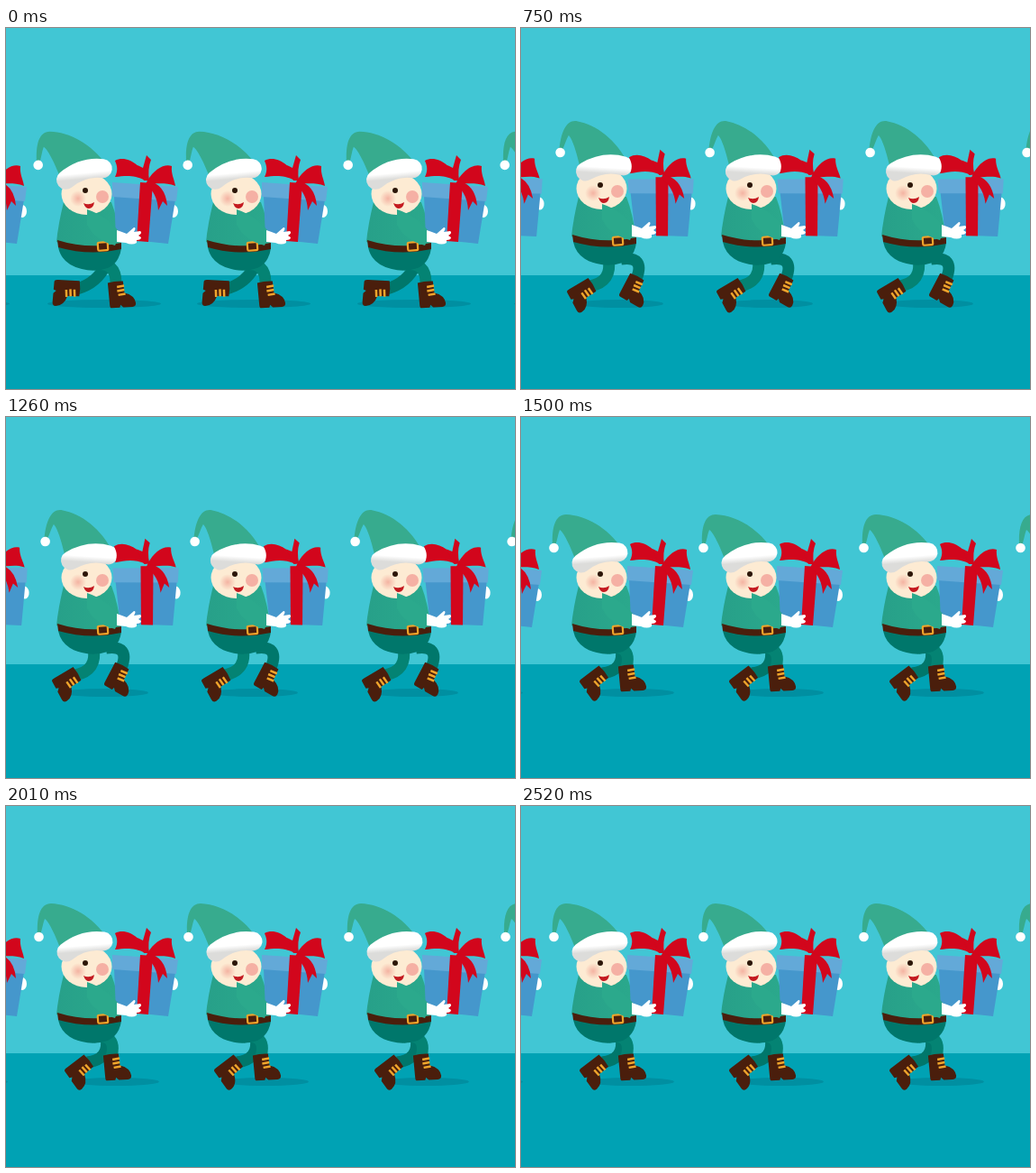
Animation, 565 px wide and 400 px high, one loop 2.55 s. Source, as an HTML page:

```html
<!DOCTYPE html>
<html lang="en">
<head>
<meta charset="utf-8">
<title>Marching elves</title>
<style>
html, body { margin: 0; width: 100%; height: 100%; overflow: hidden; background: #41c6d4; }
svg { display: block; width: 565px; height: 400px; }
</style>
</head>
<body>
<svg viewBox="0 0 565 400">
  <defs>
    <linearGradient id="fur" x1="0" y1="0" x2=".25" y2="1">
      <stop offset=".5" stop-color="#fff"/><stop offset="1" stop-color="#dcdcda"/>
    </linearGradient>
    <radialGradient id="blush">
      <stop offset="0" stop-color="#f4b3a2"/><stop offset="1" stop-color="#f4b3a2" stop-opacity="0"/>
    </radialGradient>
    <linearGradient id="coat" x2="1">
      <stop offset="0" stop-color="#27a089"/><stop offset="1" stop-color="#2ba98c"/>
    </linearGradient>
    <g id="boot">
      <path d="M-9-2Q0-4 8-3L9 10Q20 13 21 22Q21 26 17 26H7L4 23L3 26H-6Q-8 26-8 22Z" fill="#4a1e0c"/>
      <path d="M1 3L9 2M1 7.500L9 6.500M2 12L10 11" stroke="#f0a52c" stroke-width="2.500"/>
    </g>
    <g id="elf">
      <ellipse id="shadow" cy="305.500" ry="4.500" fill="#008fa1"/>
      <path id="legB" class="leg" fill="none" stroke="#00776b" stroke-width="13"/>
      <use id="bootB" href="#boot"/>
      <path id="legA" fill="none" stroke="#048373" stroke-width="13"/>
      <use id="bootA" href="#boot"/>
      <g id="body">
        <path d="M58 237Q62 256 84 261Q98 265 113 260Q126 254 128 238Z" fill="#00776b"/>
        <path d="M64 187Q58 211 56 231Q92 245 128 234Q124 205 117 187Z" fill="url(#coat)"/>
        <path d="M57 229Q92 240 128 232V239Q93 247 58 237Z" fill="#4a1e0c"/>
        <rect x="102" y="231.500" width="11" height="9" rx="1.500" fill="#4a1e0c" stroke="#f0a52c" stroke-width="2.200" transform="rotate(-4 107 236)"/>
        <g fill="#f0a52c"><circle cx="103" cy="196" r="2"/><circle cx="101" cy="206" r="2.300"/><circle cx="104" cy="213" r="2.300"/></g>
        <ellipse cx="89.500" cy="178" rx="28" ry="23" fill="#fdebd3"/>
        <circle cx="80" cy="183" r="9" fill="url(#blush)"/>
        <circle cx="107" cy="181" r="7" fill="#f5b0a4"/>
        <circle cx="88" cy="174" r="3" fill="#2c1608"/>
        <path d="M86 188Q92 191 98 187Q97 194 92 194Q88 194 86 188Z" fill="#c41a20"/>
        <g id="hat">
          <path d="M35 143C34 122 38 108 50 108C72 109 96 122 113 147L62 162C56 146 48 128 43 125C41 130 40 137 38 143Z" fill="#37ab8e"/>
          <path d="M67 162Q86 147 108 150" fill="none" stroke="url(#fur)" stroke-width="21" stroke-linecap="round"/>
          <circle cx="36.500" cy="145" r="5.300" fill="#fff"/>
        </g>
        <g id="gift">
          <ellipse cx="186" cy="197" rx="5" ry="7" fill="#fff"/>
          <path d="M120 180L188 184L180 233L122 227Z" fill="#4597cc"/>
          <path d="M118 165L191 170L189 186L118 181Z" fill="#63a9d8"/>
          <g fill="#d2061c">
            <path d="M149 165L163 166L158 231L145 230Z"/>
            <path d="M155 163C141 156 132 158 121 159C125 151 123 146 121 141C134 134 151 147 157 161Z"/>
            <path d="M157 163C165 150 176 144 184 147C183 156 187 162 188 169C176 164 166 168 157 165Z"/>
            <path d="M153 163L146 146L152 149L156 135L161 140Q157 150 159 163Z"/>
            <path d="M157 163Q177 167 179 191L174 186L169 196Q168 177 155 167Z"/>
          </g>
        </g>
        <path d="M90 195Q114 203 127 222L121 235Q98 229 90 212Z" fill="#2ba98c"/>
        <path d="M123 218Q129 220 134 222L142 215Q145 215 142 220L149 219Q152 221 147 224L150 226Q150 229 145 229L145 232Q140 235 133 232L123 231Z" fill="#fff"/>
      </g>
    </g>
  </defs>
  <rect width="565" height="400" fill="#41c6d4"/>
  <rect y="274" width="565" height="126" fill="#00a2b4"/>
  <use href="#elf" x="-168"/><use href="#elf"/><use href="#elf" x="166"/>
  <use href="#elf" x="344"/><use href="#elf" x="518"/>
</svg>
<script>
const STEP = 30, CYCLE = 17;
const $ = id => document.getElementById(id);
const set = (id, attrs) => { for (const k in attrs) $(id).setAttribute(k, attrs[k]); };

// Each key: [phase, ...values]
const feet = {
  A: [[0, 122, 284, -3], [4, 98, 285, 5], [8, 77, 286, 62], [12, 90, 275, 58], [16, 117, 278, -3]],
  B: [[0, 79, 289, 95], [4, 95, 274, 65], [8, 128, 278, 30], [12, 110, 285, 0], [16, 90, 284, 55]]
};
const hips = { A: 97, B: 111 };
const bounce = [[0, 6], [2, 7], [5, -3], [8, 0], [10, 4], [13, -4], [16, 0]];
const sway = [[0, -1, 0], [4, 3, 0], [8, 8, 1], [12, 6, .7], [16, 0, 0]];
const shade = [[0, 109, 63], [4, 108, 56], [8, 110, 48], [12, 117, 48], [16, 122, 48]];

// Smooth periodic curve through the keys
function sample(keys, phase) {
  const n = keys.length;
  const key = i => {
    const lap = Math.floor(i / n), [p, ...v] = keys[i - lap * n];
    return [p + lap * CYCLE, ...v];
  };
  let i = 0;
  while (key(i + 1)[0] <= phase) i++;
  const [a, b, c, d] = [-1, 0, 1, 2].map(k => key(i + k));
  const span = c[0] - b[0], u = (phase - b[0]) / span;
  return b.slice(1).map((v, j) => {
    const w = c[j + 1];
    const m = (w - a[j + 1]) / (c[0] - a[0]) * span;
    const k = (d[j + 1] - v) / (d[0] - b[0]) * span;
    return v + u * (m + u * (3 * (w - v) - 2 * m - k + u * (2 * (v - w) + m + k)));
  });
}

function drawLeg(name, phase, dy) {
  const [x, y, turn] = sample(feet[name], phase);
  const hx = hips[name], hy = 256 + dy;
  const dx = x - hx, h = y - hy, dist = Math.hypot(dx, h);
  const bend = 1.4 * Math.sqrt(Math.max(0, 484 - dist * dist / 4)) / dist;
  const kx = (x + hx) / 2 + h * bend, ky = (y + hy) / 2 - dx * bend;
  set('leg' + name, { d: `M${hx} ${hy}Q${kx} ${ky} ${x} ${y}` });
  set('boot' + name, { transform: `translate(${x} ${y}) rotate(${turn})` });
}

function draw(now) {
  const phase = Math.floor(now / STEP) % CYCLE;
  const [dy] = sample(bounce, phase);
  const [tilt, lean] = sample(sway, phase);
  const [cx, rx] = sample(shade, phase);
  set('shadow', { cx, rx });
  set('body', { transform: `translate(0 ${dy})` });
  set('hat', { transform: `translate(${tilt * .6} 0) rotate(${tilt} 88 158)` });
  set('gift', { transform: `translate(${lean * 5} 0) rotate(${lean * -4} 150 230)` });
  drawLeg('A', phase, dy);
  drawLeg('B', phase, dy);
}

const start = performance.now();
function tick() {
  draw(performance.now() - start);
  requestAnimationFrame(tick);
}
tick();
</script>
</body>
</html>
```
